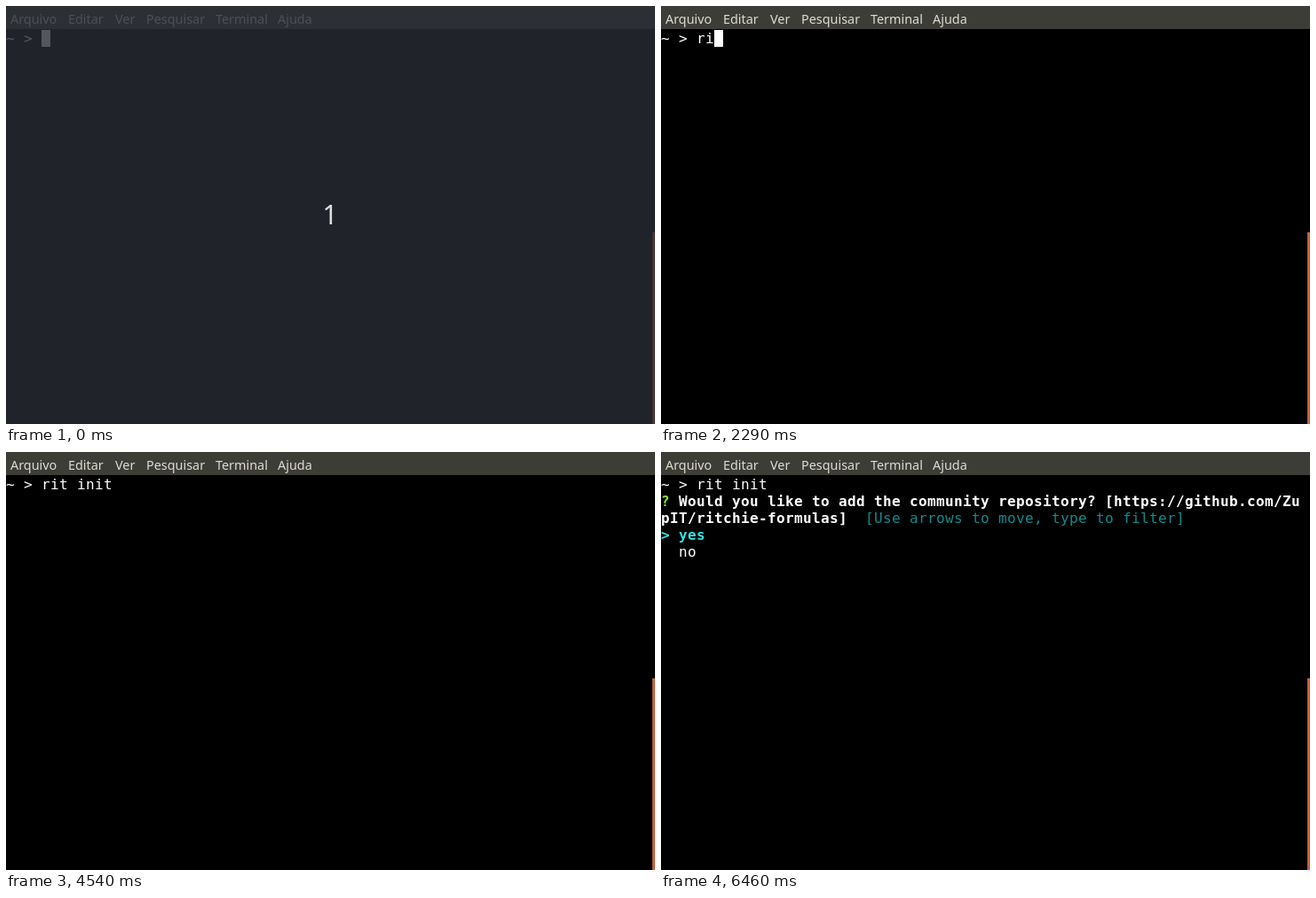
An HTML page with a canvas for the animation above (8000 ms loop, 731 px wide and 471 px high).

```html
<!DOCTYPE html>
<html lang="pt">
<head>
<meta charset="utf-8">
<style>
  html, body { margin: 0; width: 100%; height: 100%; overflow: hidden; background: #000; }
  canvas { display: block; }
</style>
</head>
<body>
<canvas id="stage" width="731" height="471"></canvas>
<script>
const ctx = document.getElementById('stage').getContext('2d');
const LOOP = 8000, CELL_W = 10, CELL_H = 19, TOP = 27;
const COMMAND = 'rit init';
const KEY_TIMES = [1960, 2290, 2580, 2880, 3080, 3330, 3670, 3960];
const BLINKS = [40, 670, 1290, 1880, 4540, 5130, 5710, 6380];
const ENTER = 6420, PROMPT = 6460;
const MENU = [['Arquivo', 5], ['Editar', 70], ['Ver', 123], ['Pesquisar', 158], ['Terminal', 236], ['Ajuda', 306]];

function rect(color, x, y, w, h) {
  ctx.fillStyle = color;
  ctx.fillRect(x, y, w, h);
}

// Terminal text sits on a fixed character grid.
function print(text, col, row, color = '#fff', weight = 'normal') {
  ctx.font = `${weight} 16px "DejaVu Sans Mono", monospace`;
  ctx.fillStyle = color;
  [...text].forEach((ch, i) => ctx.fillText(ch, (col + i) * CELL_W, TOP + row * CELL_H + 15));
}

function cursor(col, row) {
  rect('#fff', col * CELL_W, TOP + row * CELL_H, CELL_W, CELL_H);
}

function drawWindow() {
  rect('#000', 0, 0, 731, 471);
  rect('#3d3d38', 0, 0, 731, 26);
  ctx.font = '14.4px "Noto Sans", sans-serif';
  ctx.fillStyle = '#dfdbd2';
  for (const [label, x] of MENU) ctx.fillText(label, x, 20);
  rect('#c8623a', 728, 255, 3, 216);
}

function drawPrompt() {
  print('?', 0, 1, '#8ae234', 'bold');
  print('Would you like to add the community repository? [https://github.com/Zu', 2, 1, '#fff', 'bold');
  print('pIT/ritchie-formulas]', 0, 2, '#fff', 'bold');
  print('[Use arrows to move, type to filter]', 23, 2, '#118b8d');
  print('> yes', 0, 3, '#34e2e2', 'bold');
  print('no', 2, 4);
}

function drawCountdown() {
  rect('rgba(40, 44, 52, 0.8)', 0, 0, 731, 471);
  ctx.font = '30px "Noto Sans", sans-serif';
  ctx.fillStyle = '#e0e0e0';
  ctx.textAlign = 'center';
  ctx.fillText('1', 365, 246);
  ctx.textAlign = 'left';
}

function draw(t) {
  const passed = times => times.filter(time => t >= time).length;
  const typed = passed(KEY_TIMES);
  drawWindow();
  print('~ > ' + COMMAND.slice(0, typed), 0, 0);
  if (t >= PROMPT) drawPrompt();
  else if (t >= ENTER) cursor(0, 1);
  else if (passed(BLINKS) % 2 === 0) cursor(4 + typed, 0);
  if (t < 40) drawCountdown();
}

function tick() {
  draw(performance.now() % LOOP);
  requestAnimationFrame(tick);
}
tick();
</script>
</body>
</html>
```
